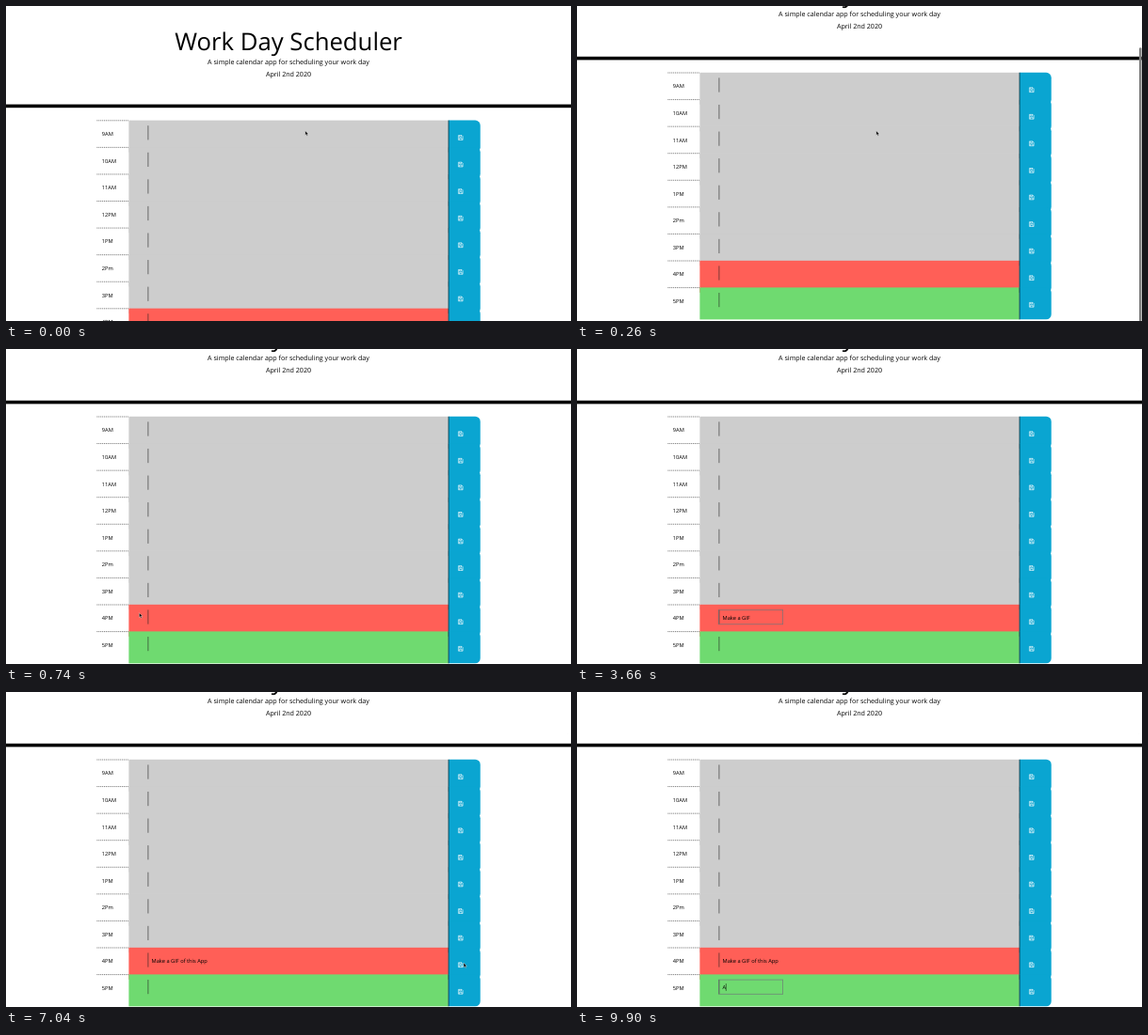
Write an HTML page that moves like this. It is 600 px wide and 335 px high and loops after 10 s.

```html
<!DOCTYPE html>
<html lang="en">
<head>
<meta charset="utf-8">
<title>Scheduler</title>
<style>
  html, body { margin: 0; width: 100%; height: 100%; overflow: hidden; background: #fff; }
  svg { display: block; width: 600px; height: 335px; }
  text { font-family: "Open Sans", sans-serif; white-space: pre; text-rendering: geometricPrecision; }
  .mid { text-anchor: middle; }
</style>
</head>
<body>
<svg id="stage" viewBox="0 0 600 335"></svg>
<script>
const LOOP = 10000;
const TOP = 121.6, PITCH = 28.571, ROW_H = 34;
const LEFT = 96.4, MID = 130.4, BTN = 469.8, RIGHT = 503.7;
const FIELD = { x: 150.9, y: 5.9, w: 68, h: 15.2 };
const HOURS = ['9AM', '10AM', '11AM', '12PM', '1PM', '2Pm', '3PM', '4PM', '5PM'];
const PAST = '#cdcdcd', PRESENT = '#ff5f57', FUTURE = '#6fda70', BLUE = '#0aa5d1';

const stage = document.getElementById('stage');

function add(parent, tag, attrs, content) {
  const el = document.createElementNS('http://www.w3.org/2000/svg', tag);
  for (const key in attrs) el.setAttribute(key, attrs[key]);
  if (content) el.textContent = content;
  return parent.appendChild(el);
}
const show = (el, on) => el.setAttribute('visibility', on ? 'visible' : 'hidden');
const move = (el, x, y) => el.setAttribute('transform', `translate(${x} ${y})`);

// Page
const page = add(stage, 'g', {});
const heading = (y, size, str) =>
  add(page, 'text', { class: 'mid', x: 300, y, 'font-size': size }, str);
heading(47, 25.714, 'Work Day Scheduler');
heading(62, 7.143, 'A simple calendar app for scheduling your work day');
heading(74.8, 7.143, 'April 2nd 2020');
add(page, 'rect', { x: 0, y: 104.6, width: 600, height: 3.6 });

function saveIcon(parent) {
  const g = add(parent, 'g', { transform: 'translate(480.1 15.7)', fill: 'none', stroke: '#fff', 'stroke-width': 0.6 });
  add(g, 'path', { d: 'M.3 .3H3.9L5 1.4V5.1H.3Z' });
  add(g, 'path', { d: 'M1.3 .3V1.8H3.5V.3M1.3 5.1V3.2H4V5.1' });
}

const fields = HOURS.map((hour, i) => {
  const row = add(page, 'g', { transform: `translate(0 ${TOP + i * PITCH})` });
  const fill = i < 7 ? PAST : i === 7 ? PRESENT : FUTURE;
  add(row, 'path', { d: `M${LEFT} .2H${MID}`, stroke: '#000', 'stroke-width': 0.5, 'stroke-dasharray': '1.1 .8' });
  add(row, 'text', { x: 101.8, y: 16.6, 'font-size': 5.714 }, hour);
  add(row, 'rect', { x: MID, y: 0, width: BTN - MID, height: ROW_H, fill });
  const r = 5.36;
  add(row, 'path', {
    d: `M${BTN} 0H${RIGHT - r}a${r} ${r} 0 0 1 ${r} ${r}V${ROW_H - r}a${r} ${r} 0 0 1 ${-r} ${r}H${BTN}Z`,
    fill: BLUE
  });
  add(row, 'path', { d: `M${BTN + 0.2} 0V${ROW_H}`, stroke: '#000', 'stroke-width': 0.6 });
  saveIcon(row);
  add(row, 'path', { d: `M${FIELD.x} ${FIELD.y - 0.3}v${FIELD.h}`, stroke: '#222', 'stroke-width': 0.6 });
  return {
    ring: add(row, 'rect', {
      x: FIELD.x - 0.3, y: FIELD.y - 0.2, width: FIELD.w, height: FIELD.h,
      fill: 'none', stroke: '#6f7478', 'stroke-opacity': 0.8, 'stroke-width': 0.8
    }),
    text: add(row, 'text', { x: 154.5, y: 15.8, 'font-size': 5.714 }),
    caret: add(row, 'path', { d: 'M0 9.7v7.8', stroke: '#000', 'stroke-width': 0.5 })
  };
});

const thumb = add(stage, 'rect', { x: 597, width: 2.5, height: 291, rx: 1.25, fill: '#808080' });
const arrow = add(stage, 'path', {
  d: 'M0 0V4.7L1.1 3.7L1.9 5.5L2.7 5.1L1.9 3.4H3.4Z',
  stroke: '#fff', 'stroke-width': 0.35
});
const beam = add(stage, 'path', {
  d: 'M-1.2 -3.3Q0 -3.3 0 -2.6V2.6Q0 3.3 -1.2 3.3M1.2 -3.3Q0 -3.3 0 -2.6M0 2.6Q0 3.3 1.2 3.3',
  fill: 'none', stroke: '#111', 'stroke-width': 0.5
});

// Timing
const smooth = u => u * u * (3 - 2 * u);
const linear = u => u;

function track(keys, t, ease) {
  let i = keys.findIndex(k => k[0] > t);
  if (i < 0) return keys[keys.length - 1].slice(1);
  if (i === 0) return keys[0].slice(1);
  const a = keys[i - 1], b = keys[i];
  const u = ease((t - a[0]) / (b[0] - a[0]));
  return a.slice(1).map((v, j) => v + (b[j + 1] - v) * u);
}

const SCROLL = [[100, 0], [140, 7], [180, 25], [220, 44], [260, 50.8], [420, 49.8]];
const THUMB = [[100, 0], [140, 1], [480, 1], [660, 0]];
const MOUSE = [
  [320, 317.8, 132.8], [700, 141.5, 280.7], [880, 141.5, 280.7], [1040, 176, 285.5],
  [1160, 178, 285.5], [1340, 180.5, 285.5], [6420, 180.5, 285.5], [6900, 486, 288],
  [7120, 486, 288], [7420, 482, 290], [7480, 482, 290], [7880, 275.8, 326.3],
  [8300, 178, 314.5]
];

const ENTRIES = [
  {
    field: fields[7], str: 'Make a GIF of this App', focus: [1040, 7020],
    // start, end, characters before, characters after
    bursts: [[1700, 2640, 0, 6], [3000, 3360, 6, 11], [3720, 4560, 11, 20], [5520, 5780, 20, 22]],
    off: [[1340, 1640], [2940, 3000], [3660, 3720], [5160, 5460], [6100, 6420], [6720, 7020]]
  },
  {
    field: fields[8], str: 'A', focus: [8360, LOOP],
    bursts: [[9700, 9701, 0, 1]],
    off: [[8660, 8960], [9260, 9560]]
  }
];
const within = (t, [a, b]) => t >= a && t < b;

function typed(bursts, t) {
  let n = 0;
  for (const [start, end, from, to] of bursts) {
    if (t >= start) n = Math.min(to, from + 1 + Math.floor((t - start) / (end - start) * (to - from - 1) + 1e-6));
  }
  return n;
}

function drawEntry({ field, str, focus, bursts, off }, t) {
  const value = str.slice(0, typed(bursts, t));
  if (field.text.textContent !== value) field.text.textContent = value;
  const focused = within(t, focus);
  show(field.ring, focused);
  show(field.caret, focused && !off.some(span => within(t, span)));
  move(field.caret, 154.7 + (value ? field.text.getComputedTextLength() : 0), 0);
}

function render(t) {
  const [scroll] = track(SCROLL, t, linear);
  move(page, 0, -scroll);
  thumb.setAttribute('y', scroll * 0.87);
  thumb.setAttribute('opacity', track(THUMB, t, linear)[0]);

  ENTRIES.forEach(entry => drawEntry(entry, t));

  const [x, y] = track(MOUSE, t, smooth);
  const rowY = (y + scroll - TOP) % PITCH;
  const overField = within(x, [FIELD.x, FIELD.x + FIELD.w]) && within(rowY, [FIELD.y, FIELD.y + FIELD.h]);
  const hidden = within(t, [1700, 6420]) || t >= 9700;
  show(arrow, !hidden && !overField);
  show(beam, !hidden && overField);
  move(arrow, x, y);
  move(beam, x, y);
}

fields.forEach(f => { show(f.ring, false); show(f.caret, false); });
const begin = performance.now();
function tick() {
  render((performance.now() - begin) % LOOP);
  requestAnimationFrame(tick);
}
tick();
</script>
</body>
</html>
```
